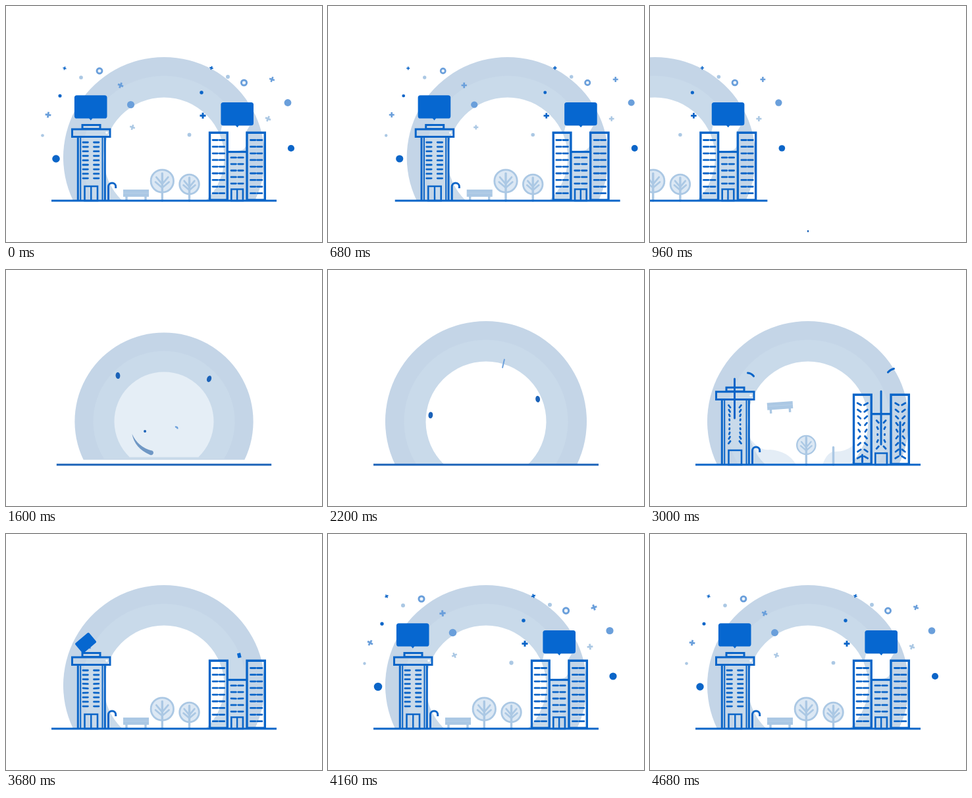
Animation of 480x360 px, one loop 4.72 s. Source, as an HTML page:

```html
<!DOCTYPE html>
<html lang="en">
<head>
<meta charset="utf-8">
<title>Two buildings</title>
<style>
html, body { margin: 0; width: 100%; height: 100%; overflow: hidden; background: #fff; }
svg { display: block; width: 100vw; height: 100vh; }
</style>
</head>
<body>
<svg id="stage" viewBox="0 0 480 360"></svg>
<script>
const LOOP = 4720, SWAP = 1100, GROUND = 297;
const DARK = '#0b65c8', BUBBLE = '#0667d0', MID = '#6a9fdb', PALE = '#abc8e4', MIST = '#dce8f4';
const stage = document.getElementById('stage');

const clamp = u => Math.max(0, Math.min(1, u));
const span = (t, start, dur) => clamp((t - start) / dur);
const mix = (a, b, u) => a + (b - a) * u;
const out = u => 1 - (1 - u) ** 3;
const inOut = u => u < .5 ? 4 * u ** 3 : 1 - 4 * (1 - u) ** 3;
const backIn = u => 2.70158 * u ** 3 - 1.70158 * u ** 2;
const backOut = u => 1 - backIn(1 - u);

const group = (move, body) => `<g transform="${move}">${body}</g>`;
const shape = (d, fill, opacity = 1) => `<path d="${d}" fill="${fill}" opacity="${opacity}"/>`;
const stroke = (d, w = 3, color = DARK, cap = 'butt', fill = 'none') =>
  `<path d="${d}" fill="${fill}" stroke="${color}" stroke-width="${w}" stroke-linecap="${cap}"/>`;
const dot = (x, y, r, fill) => `<circle cx="${x}" cy="${y}" r="${r}" fill="${fill}"/>`;
const box = (x, y, w, h, sw = 3) => stroke(`M${x} ${y}h${w}v${h}h${-w}z`, sw);
const grow = (x, y, sx, sy, body) =>
  group(`translate(${x} ${y}) scale(${sx} ${sy}) translate(${-x} ${-y})`, body);

// Position along [time, x, y] points
function along(points, t) {
  let i = 0;
  while (i < points.length - 2 && t > points[i + 1][0]) i++;
  const [a, b] = [points[i], points[i + 1]];
  const u = span(t, a[0], b[0] - a[0]);
  return [mix(a[1], b[1], u), mix(a[2], b[2], u)];
}

// Disc with a flat foot, scaled about the arch centre
function disc(r, start, t, fill) {
  const s = out(span(t, start, 964));
  if (!s) return '';
  const half = Math.sqrt(r * r - 66 * 66) * s, y = 231 + 66 * s;
  return shape(`M${240 - half} ${y}A${r * s} ${r * s} 0 1 1 ${240 + half} ${y}z`, fill);
}

function arch(t) {
  const u = span(t, 1620, 450);
  const hole = `rgb(${mix(229, 255, u)},${mix(238, 255, u)},${mix(246, 255, u)})`;
  return disc(153, 1104, t, '#c4d5e7') + disc(124.5, 1133, t, '#c9daea') + disc(91.5, 1176, t, hole);
}

// Soft mounds that pass behind the trees
function mounds(t) {
  const k = Math.sin(Math.PI * span(t, 2600, 800));
  return k ? shape('M153 258Q166 276 182 274Q210 276 222 297H176Q160 284 153 258z' +
    'M262 297Q268 280 278 277Q296 278 308 268V290L303 297z', '#e4edf6', k) : '';
}

// Dashes that unfold from points and settle level, middle rows last
function windows(cols, top, step, rows, start, t) {
  let s = '';
  for (let i = 0; i < rows; i++) {
    const edge = Math.abs(i / (rows - 1) - .5) * 2;
    const u = span(t, start + (1 - edge) * 200, 900);
    if (!u) continue;
    const e = out(u), y = top + i * step;
    cols.forEach((x, k) => {
      const turn = (1 - u) ** 2 * 95 * (k ? -1 : 1) * (i * 2 < rows ? 1 : -1);
      const half = 3.7 * e;
      s += group(`translate(${x} ${y}) rotate(${turn})`, stroke(`M${-half} 0H${half}`, 2.8, DARK, 'round'));
    });
  }
  return s;
}

function door(x, w, top, t) {
  const u = out(span(t, 2700, 280)), split = out(span(t, 3050, 350));
  if (!u) return '';
  const h = (GROUND - top) * u, mid = x + w / 2;
  return box(x, GROUND - h, w, h, 2.6) + (split ? stroke(`M${mid} ${GROUND}V${mix(GROUND, top, split)}`, 2.4) : '');
}

// Construction line that stretches, then folds to its foot
function rod(x, y1, y2, t) {
  const a = out(span(t, 2650, 350)), b = inOut(span(t, 3000, 350));
  if (!a || b === 1) return '';
  return stroke(`M${x} ${y2}V${mix(y2, y1, a * (1 - b))}`, 3, DARK, 'round');
}

function tower(t) {
  const s = backOut(span(t, 2350, 740));
  if (s <= 0) return '';
  return grow(129, GROUND, Math.min(1, s), s,
      box(116, 181.5, 27, 6) + box(100.5, 188, 57.5, 11.5) +
      stroke('M109.3 200V297M150.3 200V297', 3) + stroke('M113.2 200V297M146.5 200V297', 2) +
      dot(153, 193.3, 1.7, '#fff')) +
    windows([120.7, 137.2], 208, 6.85, 9, 2770, t) + door(119.5, 19.5, 275, t) + rod(128.5, 166, 226, t);
}

function block(t) {
  const side = backOut(span(t, 2400, 706)), mid = backOut(span(t, 2450, 670));
  let s = '';
  if (side > 0) s += grow(351, GROUND, 1, side, box(309.5, 193.3, 26.7, 102.7, 3.4) + box(366, 193.3, 27.3, 102.7, 3.4));
  if (mid > 0) s += grow(351, GROUND, 1, mid, stroke('M337 222.5H366', 3.2));
  return s + windows([317.8, 328], 204.5, 10.15, 9, 2600, t) +
    windows([375.2, 385.2], 204.5, 10.15, 9, 2620, t) +
    windows([345.7, 356.5], 231.2, 9.9, 5, 2740, t) + door(342.3, 17.6, 279.5, t) +
    rod(351, 185, 266, t) + rod(380, 232, 282, t) + rod(322.5, 282, 293, t);
}

function lamp(t) {
  const u = out(span(t, 2600, 380));
  if (!u) return '';
  return `<path d="M155.5 297V275.5a5.6 5.6 0 0 1 11.2 0v2.5" fill="none" stroke="${DARK}" stroke-width="3"
    pathLength="1" stroke-dasharray="${u} 2"/>`;
}

function tree(x, y, r, start, t) {
  const trunk = out(span(t, start, 320)), crown = backOut(span(t, start + 180, 480));
  if (!trunk) return '';
  let s = '';
  if (crown > 0) s += grow(x, y, crown, crown,
    `<circle cx="${x}" cy="${y}" r="${r - 1.4}" fill="${MIST}" stroke="${PALE}" stroke-width="2.8"/>` +
    stroke(`M${x - r * .48} ${y - r * .32}L${x} ${y + r * .25}L${x + r * .48} ${y - r * .32}` +
      `M${x - r * .55} ${y + r * .08}L${x} ${y + r * .55}L${x + r * .55} ${y + r * .08}`, 2.8, PALE, 'round'));
  return s + stroke(`M${x} ${GROUND}V${mix(GROUND, y - r * .62, trunk)}`, 3.4, PALE, 'round');
}

function bench(t) {
  const u = span(t, 2780, 440);
  if (!u) return '';
  const drop = -158 * (1 - u), tilt = -8 * (1 - u);
  return group(`translate(197.5 ${286 + drop}) rotate(${tilt})`,
    shape('M-19.5 -6h39v11h-39z', PALE) + stroke('M-19.5 -.7h39', .5, '#c4d8ec') +
    stroke('M-14.5 4V10.5M14.5 4V10.5', 3.4, PALE));
}

function bubble(x, y, start, way, t) {
  const u = span(t, start, 500);
  if (!u) return '';
  const s = out(u);
  return group(`translate(${x} ${y}) rotate(${way * 90 * (1 - s)}) scale(${s})`,
    `<rect x="-24.8" y="-39" width="49.6" height="35.3" rx="3.6" fill="${BUBBLE}"/>` +
    shape('M-2.8 -4.2H2.8L.2 -.8z', BUBBLE));
}

// Pieces that fly about while the arch opens
function flyers(t) {
  let s = '';
  const pair = [
    [[[1300, 232, 231], [1600, 170, 161], [1880, 153, 182], [2200, 156, 221], [2400, 129, 297]], 6, -5],
    [[[1300, 248, 231], [1600, 308.5, 166], [1880, 321, 176], [2200, 318.5, 196.5], [2430, 351, 297]], -8, 20]
  ];
  for (const [path, tilt, lean] of pair) {
    if (t < 1300 || t > path[4][0]) continue;
    const [x, y] = along(path, t), k = out(span(t, 1300, 200));
    s += group(`translate(${x} ${y}) rotate(${mix(lean, tilt, span(t, 1600, 600))}) scale(${k})`,
      `<ellipse rx="3.4" ry="5" fill="#1b62b8"/>`);
  }
  if (t > 1400 && t < 1860) {
    const turn = (t - 1600) * -.16, k = Math.sin(Math.PI * span(t, 1400, 460));
    s += group(`translate(240 231) rotate(${turn}) scale(${mix(.6, 1, k)}) translate(-240 -231)`,
      shape('M191 250Q200 270 220 275.5A3.6 3.6 0 1 1 218 282Q195 272 191 250z', '#7098c5') +
      dot(210.8, 246, 2, '#1b62b8') + stroke('M257 239.5q4 -.5 3.5 3', 2.4, MID));
  }
  if (t > 2050 && t < 2350) {
    const k = Math.sin(Math.PI * span(t, 2050, 300));
    s += group(`translate(266.5 ${142.5 + (t - 2200) * .12}) rotate(13) scale(${k})`, stroke('M0 -7V7', 1.9, MID));
  }
  if (t > 2860 && t < 3140) {
    const k = Math.sin(Math.PI * span(t, 2860, 280)), d = (t - 3000) * .04;
    s += group(`translate(${153 + d} ${159 + d}) scale(${k})`, stroke('M-4.5 -2Q1 -1.5 4.5 3', 3, DARK, 'round')) +
      group(`translate(${366 - d} ${153 + d}) scale(${k})`, stroke('M-4.5 3Q-1 -1 4.5 -2.5', 3, DARK, 'round'));
  }
  return s;
}

// kind, x, y, radius, colour, tilt
const sparks = [
  ['plus', 89, 95, 2.6, DARK, 1], ['dot', 114, 109, 2.8, PALE], ['ring', 142, 99, 3.8, MID],
  ['plus', 174, 121, 4.3, MID, 1.4], ['dot', 82, 137, 2.5, DARK], ['plus', 64, 166, 4.2, MID, .5],
  ['dot', 76, 233, 5.8, DARK], ['dot', 189.5, 150.5, 5.4, MID], ['plus', 192, 185, 3.8, PALE, 1.1],
  ['dot', 278.5, 196.5, 2.9, PALE], ['plus', 299, 167.3, 4.4, DARK, 0], ['dot', 297, 132, 2.6, DARK],
  ['plus', 312, 94.5, 2.8, DARK, 1.2], ['dot', 337, 108, 2.9, PALE], ['ring', 361.5, 117, 3.9, MID],
  ['plus', 404, 112, 4.1, MID, 1.2], ['dot', 428, 147.5, 5.3, MID], ['plus', 398, 172, 4.1, PALE, 1.4],
  ['dot', 433, 217, 5.1, DARK], ['dot', 55.5, 197.5, 2.3, PALE]
];

function spark([kind, x, y, r, color, tilt], i, t) {
  const start = i === 19 ? 3960 : 3700 + i * 7 % 10 * 18;
  const u = span(t, start, 600);
  if (!u) return '';
  const k = Math.max(0, backOut(u)) * (1 + .06 * u * Math.sin((t - LOOP) / 180 + i % 3 * .4));
  const turn = tilt ? 90 * tilt * (1 - span(t, 3900, 1420)) ** 2 : 0;
  const body = kind === 'dot' ? dot(0, 0, r, color)
    : kind === 'ring' ? `<circle r="${r}" fill="#eef4fa" stroke="${color}" stroke-width="2.8"/>`
    : stroke(`M${-r} 0H${r}M0 ${-r}V${r}`, r * .65, color);
  return group(`translate(${x} ${y}) rotate(${turn}) scale(${k})`, body);
}

function ground(t) {
  const u = span(t, 1216, 600);
  const half = mix(1, 171, out(u)), y = mix(343.5, GROUND, inOut(span(t, 960, 520)));
  return stroke(`M${240 - half} ${y}H${240 + half}`, 2.8, t < 2300 ? '#1b62b8' : DARK);
}

function scene(t) {
  const gap = span(t, 3740, 200);
  const patch = gap ? shape('M328 183H370L364 193V214Q362 221 351 221H337V192H326z', '#fff', gap) : '';
  return arch(t) + mounds(t) + patch + flyers(t) +
    tree(237.3, 267, 18.6, 2700, t) + tree(278.5, 272, 16.2, 2880, t) + bench(t) +
    lamp(t) + tower(t) + block(t) + ground(t) +
    bubble(128.7, 175.2, 3563, -1, t) + bubble(351.2, 186, 3655, 1, t) +
    sparks.map((p, i) => spark(p, i, t)).join('');
}

function render(t) {
  if (t >= SWAP) {
    stage.innerHTML = scene(t);
    return;
  }
  const u = span(t, 560, 462);
  stage.innerHTML = (u < 1 ? group(`translate(${-480 * backIn(u)} 0)`, scene(t + LOOP)) : '') +
    (t >= 940 ? ground(t) : '');
}

const begin = performance.now();
function tick() {
  render((performance.now() - begin) % LOOP);
  requestAnimationFrame(tick);
}
tick();
</script>
</body>
</html>
```
